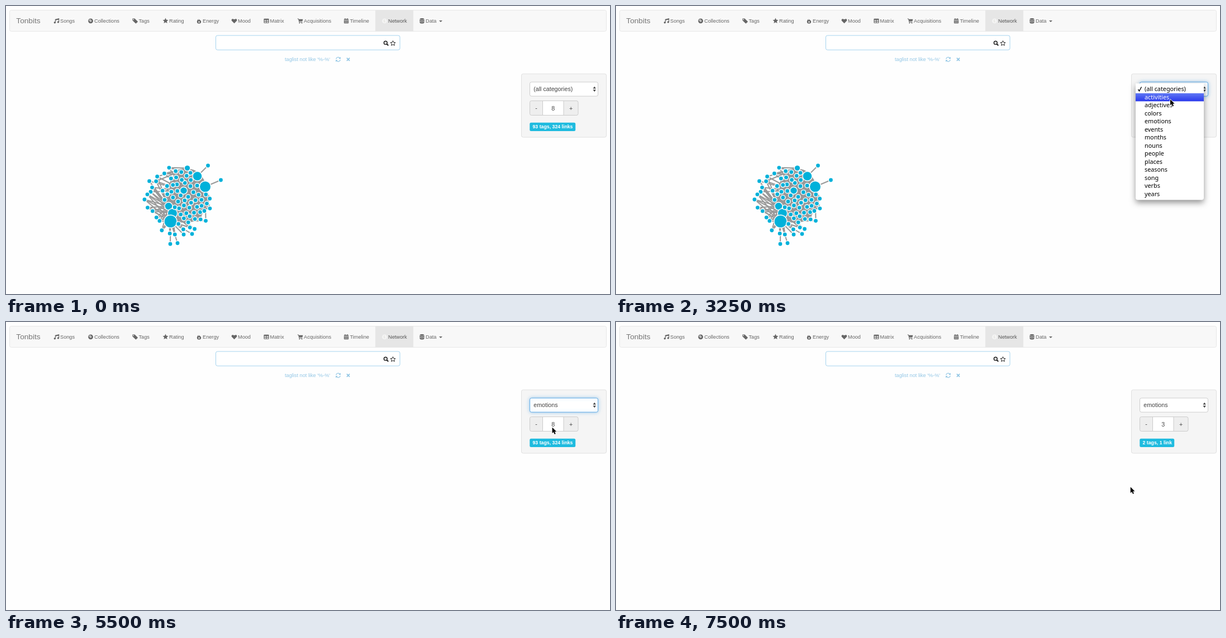
These frames come from a looping animation (1081 by 518 pixels, 8000 ms). An HTML page with a canvas:

```html
<!DOCTYPE html>
<html lang="en">
<head>
<meta charset="utf-8">
<title>Tag network</title>
<style>
html, body { margin: 0; width: 100%; height: 100%; overflow: hidden; background: #fefefe; }
canvas { display: block; }
</style>
</head>
<body>
<canvas id="stage" width="1081" height="518"></canvas>
<script>
const ctx = document.getElementById('stage').getContext('2d');
const LOOP = 8000;
const STEP = 250;
const SANS = '"Liberation Sans", Arial, sans-serif';
const MENU_FONT = '500 10.8px "Noto Sans", "Open Sans", sans-serif';
const CYAN = '#00b1da', GREY = '#999', PALE = '#92c6e5', INK = '#666', BAR = '#f8f8f8';
const ROW_TOP = 142.4, ROW = 14.5;

const NAV = [
  ['Songs', 97, 'music'], ['Collections', 158, 'disc'], ['Tags', 237.5, 'tag'],
  ['Rating', 292, 'star'], ['Energy', 352, 'flame'], ['Mood', 415, 'heart'],
  ['Matrix', 472.5, 'table'], ['Acquisitions', 533, 'cart'],
  ['Timeline', 615.5, 'calendar'], ['Network', 684, 'globe'], ['Data', 751, 'stack']
];
const CATEGORIES = ['(all categories)', 'activities', 'adjectives', 'colors',
  'emotions', 'events', 'months', 'nouns', 'people', 'places', 'seasons',
  'song', 'verbs', 'years'];

// when the pointer arrives, and where its tip is
const STOPS = [
  { t: 750, x: 993, y: 156.8 }, { t: 3250, x: 992, y: 168 }, { t: 3500, x: 989, y: 210.2 },
  { t: 5000, x: 981, y: 188 }, { t: 5250, x: 971.3, y: 191.5 },
  { t: 5500, x: 977.6, y: 189.5 }, { t: 7500, x: 920.8, y: 296.8 }
];

const pointerAt = t => STOPS.findLast(s => t >= s.t);

function text(s, x, y, size, color, style = '', align = 'left') {
  ctx.font = `${style} ${size}px ${SANS}`;
  ctx.fillStyle = color;
  ctx.textAlign = align;
  ctx.fillText(s, x, y);
}

function box(x, y, w, h, r, fill, stroke) {
  ctx.beginPath();
  ctx.roundRect(x, y, w, h, r);
  if (fill) { ctx.fillStyle = fill; ctx.fill(); }
  if (stroke) { ctx.strokeStyle = stroke; ctx.lineWidth = 1; ctx.stroke(); }
}

function dot(x, y, r, fill) {
  ctx.beginPath();
  ctx.arc(x, y, r, 0, 7);
  ctx.fillStyle = fill;
  ctx.fill();
}

function line(x1, y1, x2, y2, color = GREY, width = 2) {
  ctx.beginPath();
  ctx.moveTo(x1, y1);
  ctx.lineTo(x2, y2);
  ctx.strokeStyle = color;
  ctx.lineWidth = width;
  ctx.stroke();
}

function shape(d, fill) {
  ctx.fillStyle = fill;
  ctx.fill(new Path2D(d));
}

function outline(d, color, width) {
  ctx.strokeStyle = color;
  ctx.lineWidth = width;
  ctx.stroke(new Path2D(d));
}

function at(x, y, draw) {
  ctx.save();
  ctx.translate(x, y);
  draw();
  ctx.restore();
}

function starPath(r) {
  ctx.beginPath();
  for (let i = 0; i < 10; i++) {
    const a = i * Math.PI / 5 - Math.PI / 2, q = i % 2 ? r * .47 : r;
    ctx.lineTo(q * Math.cos(a), q * Math.sin(a));
  }
  ctx.closePath();
}

const ICONS = {
  music() {
    shape('M-2.6-3L4.6-4.8V-2.4L-2.6-.7Z', INK);
    outline('M-2.1-2V3M4.1-4V2', INK, 1.1);
    dot(-3.2, 3, 1.7, INK);
    dot(2.9, 2.1, 1.7, INK);
  },
  disc() {
    dot(0, 0, 4.4, INK);
    outline('M-2.8 0A2.8 2.8 0 0 1 0-2.8', BAR, .8);
    dot(0, 0, 1.7, BAR);
    dot(0, 0, .8, INK);
  },
  tag() {
    shape('M-4.6-4.2H-.6L4.7 1Q5 1.4 4.6 1.9L1.8 4.5Q1.3 4.8.9 4.5L-4.6-.7Z', INK);
    dot(-2.8, -2.4, .9, BAR);
  },
  star() { starPath(5.2); ctx.fillStyle = INK; ctx.fill(); },
  flame() {
    shape('M-.8-4.9C-.5-2.2 3.7-1.4 3.7 1.4A3.7 3.4 0 0 1-3.7 1.4C-3.7-.3-2.4-1.6-2.2-2.8C-1-2-.7-1.5-.6-.8C.3-2-.1-3.6-.8-4.9Z', INK);
    shape('M0 .2C1.8 1.4 1.6 3.3 0 3.3C-1.8 3.3-1.6 1.6 0 .2Z', BAR);
  },
  heart() { shape('M0 4.4L-4.2.2C-6-2-3.8-5.4 0-2.5C3.8-5.4 6-2 4.2.2Z', INK); },
  table() {
    box(-4.6, -4, 9.2, 8, 1, INK);
    ctx.fillStyle = BAR;
    for (const x of [-3.4, .6]) for (const y of [-1.6, 1.2]) ctx.fillRect(x, y, 2.8, 1.7);
  },
  cart() {
    outline('M-4.8-3.8H-3L-1.6 2.2H3.8', INK, 1);
    shape('M-2.8-3H4.9L3.9.8H-2Z', INK);
    dot(-1.2, 3.8, 1, INK);
    dot(3, 3.8, 1, INK);
  },
  calendar() {
    box(-4.1, -3.6, 8.2, 8.1, .8, INK);
    outline('M-2-4.8V-3M2-4.8V-3', INK, 1.2);
    line(-4.1, -1.6, 4.1, -1.6, BAR, .7);
    ctx.fillStyle = BAR;
    for (const x of [-2.8, -.6, 1.6]) for (const y of [-.4, 2]) ctx.fillRect(x, y, 1.2, 1.2);
  },
  globe() {
    dot(0, 0, 4.4, '#f5f5f5');
    shape('M-1-3L1-2L0 0L2 2L-1 3L-2 0Z', '#e9e9e6');
  },
  stack() {
    box(-4.2, -4.7, 8.4, 9.4, 3, INK);
    outline('M-4.2-2.2Q0-.2 4.2-2.2M-4.2.9Q0 2.9 4.2.9', BAR, .8);
  }
};

function header() {
  box(6.5, 7.5, 1068, 38, 3, BAR, '#e7e7e7');
  ctx.fillStyle = '#e6e6e6';
  ctx.fillRect(661, 8, 68, 38);
  text('Tonbits', 18.3, 31.3, 13.7, '#777');
  for (const [label, x, icon] of NAV) {
    at(x - 6.5, 26.8, ICONS[icon]);
    text(label, x, 30, 9.2, label === 'Network' ? '#555' : INK);
  }
  shape('M775 26H781L778 29Z', INK);

  box(375.5, 53, 329.5, 26, 3, '#fff', '#a5d3ef');
  ctx.beginPath();
  ctx.arc(679.3, 66.2, 2.9, 0, 7);
  ctx.strokeStyle = '#111';
  ctx.lineWidth = 1.4;
  ctx.stroke();
  line(681.4, 68.3, 684.3, 71, '#111', 1.8);
  at(692.5, 67.2, () => {
    starPath(4.7);
    ctx.strokeStyle = '#222';
    ctx.lineWidth = 1;
    ctx.stroke();
  });

  text("taglist not like '%-%'", 499, 99.2, 9.2, PALE);
  at(594.5, 96, () => {
    outline('M-3.8-.6A3.8 3.8 0 0 1 3-2.4M3.8.6A3.8 3.8 0 0 1-3 2.4', PALE, 1.2);
    shape('M4.4-4.4V-.9H.9ZM-4.4 4.4V.9H-.9Z', PALE);
  });
  outline('M609.9 93.4L615.1 98.6M615.1 93.4L609.9 98.6', PALE, 1.8);
}

function focusRing(x, y, w, h, r, power) {
  if (!power) return;
  ctx.save();
  ctx.globalAlpha = power;
  ctx.shadowColor = 'rgba(102,175,233,.6)';
  ctx.shadowBlur = 6;
  box(x, y, w, h, r, '#fff', '#66afe9');
  ctx.restore();
}

function panel(t) {
  box(922.5, 122, 152, 114, 3, '#f5f5f5', '#e0e0e0');
  const fading = t >= 5750 && t < 6000;

  box(937.5, 136.8, 122, 25.4, 3, '#fff', '#ccc');
  focusRing(937.5, 136.8, 122, 25.4, 3, t >= 3000 && t < 5750 ? 1 : fading ? .35 : 0);
  text(t < 4250 ? CATEGORIES[0] : 'emotions', 944.2, 153.3, 10.7, '#444');
  shape('M1050.5 148.6L1053.2 144.8L1055.9 148.6ZM1050.5 150.4L1053.2 154.2L1055.9 150.4Z', '#444');

  box(937.5, 170.5, 86.5, 26, 3, '#eee', '#ccc');
  box(960.5, 170.5, 37.5, 26, 0, '#fff', '#ccc');
  focusRing(960.5, 170.5, 37.5, 26, 0, t >= 6000 && t < 7500 ? 1 : fading ? .5 : 0);
  text('-', 949, 187.4, 10.7, '#444', '', 'center');
  text('+', 1011, 187.6, 10.7, '#444', '', 'center');
  text(t < 6000 ? '8' : '3', 979.2, 187.6, 10.7, '#444', '', 'center');
  if (t >= 6750 && t < 7250) line(983.3, 178, 983.3, 190, '#333', .8);

  const few = t >= 6250;
  box(937.3, 209.7, few ? 61.9 : 81.9, 15.2, 2.5, '#1fbbdf');
  text(few ? '2 tags, 1 link' : '93 tags, 324 links', 942.5, 220.2, 8.75, '#fff', 'bold');
}

function node({ x, y, r }) {
  dot(x, y, r + 1.4, '#fff');
  dot(x, y, r, CYAN);
}

function seeded(seed) {
  return () => (seed = seed * 16807 % 2147483647) / 2147483647;
}

const gap = (a, b) => Math.hypot(a.x - b.x, a.y - b.y);
const spot = (x, y, r = 3.4) => ({ x, y, r });

const hubs = [
  spot(342.5, 306, 7.8), spot(356.5, 325, 9.5), spot(318, 332, 5.8),
  spot(291, 360, 6.3), spot(298, 373, 8), spot(294.5, 387.5, 10.8), spot(324.5, 291.5, 4.6)
];
const tails = [spot(384.5, 313), spot(361.5, 287), spot(294, 428), spot(307, 426.5),
  spot(318, 411), spot(333, 410)];

// a sunflower core and a looser rim that bulges to the lower left
function scatter() {
  const rnd = seeded(41), turn = Math.PI * (3 - Math.sqrt(5)), core = [], rim = [];
  const add = (list, x, y, room) => {
    const p = spot(x, y);
    if ([...hubs, ...tails, ...core, ...rim].every(q => gap(p, q) > q.r + room)) list.push(p);
  };
  for (let i = 0; i < 64; i++) {
    const r = 6.3 * Math.sqrt(i + .5), a = i * turn;
    add(core, 322 + r * .9 * Math.cos(a) + rnd() * 3, 342 + r * Math.sin(a) + rnd() * 3, 3);
  }
  for (let i = 0; i < 48; i++) {
    const a = i * turn, bulge = 60 - 14 * Math.cos(a) + 6 * Math.sin(a);
    const r = bulge * (.82 + .2 * rnd());
    add(rim, 320 + r * Math.cos(a), 345 + r * Math.sin(a), 4);
  }
  return { core, rim };
}
const { core, rim } = scatter();

function link(a, count) {
  hubs.slice().sort((p, q) => gap(a, p) - gap(a, q)).slice(0, count)
    .forEach(h => line(a.x, a.y, h.x, h.y));
}

function network() {
  ctx.beginPath();
  ctx.ellipse(327, 341, 34, 48, 0, 0, 7);
  ctx.fillStyle = GREY;
  ctx.fill();
  core.forEach(p => link(p, 5));
  rim.forEach(p => link(p, 3));
  tails.forEach(p => link(p, 1));
  hubs.forEach(node);
  [...core, ...rim, ...tails].forEach(node);
}

function pair(t) {
  const k = .5 ** ((t - 6250) / STEP);
  const a = spot(302.3 + 2 * k, 358.3 - 2.6 * k, 2.9);
  const b = spot(320.3 - 1.5 * k, 342 + 1.6 * k, 10.6);
  line(a.x, a.y, b.x, b.y);
  node(a);
  node(b);
}

function menu(t) {
  const active = Math.floor((pointerAt(t).y - ROW_TOP) / ROW);
  ctx.save();
  ctx.shadowColor = 'rgba(0,0,0,.42)';
  ctx.shadowBlur = 11;
  ctx.shadowOffsetY = 5;
  box(930, 139.3, 122, 209.4, [0, 0, 4, 4], '#fff');
  ctx.restore();
  const top = ROW_TOP + ROW * active;
  const blue = ctx.createLinearGradient(0, top, 0, top + ROW);
  blue.addColorStop(0, '#6078f4');
  blue.addColorStop(1, '#2a39ec');
  ctx.fillStyle = blue;
  ctx.fillRect(930, top, 122, ROW);
  ctx.font = MENU_FONT;
  ctx.textAlign = 'left';
  CATEGORIES.forEach((name, i) => {
    ctx.fillStyle = i === active ? '#fff' : '#000';
    ctx.fillText(name, 946, 153.2 + ROW * i);
  });
  outline('M934.5 150L936.5 153L940.5 145.5', active ? '#000' : '#fff', 1.4);
}

function pointer(t) {
  const stop = pointerAt(t);
  if (!stop) return;
  at(stop.x, stop.y, () => {
    const d = 'M0 0V10.6L2.5 8.4L4.2 12.4L6.1 11.6L4.4 7.7H7.7Z';
    ctx.lineJoin = 'round';
    outline(d, '#fff', 1.6);
    shape(d, '#000');
  });
}

function render(t) {
  ctx.fillStyle = '#fefefe';
  ctx.fillRect(0, 0, 1081, 518);
  header();
  panel(t);
  if (t < 4250) network();
  if (t >= 6250 && t < 7500) pair(t);
  if (t >= 2750 && t < 4250) menu(t);
  pointer(t);
}

const start = performance.now();
function tick() {
  const t = (performance.now() - start) % LOOP;
  render(Math.floor(t / STEP) * STEP);
  requestAnimationFrame(tick);
}
tick();
</script>
</body>
</html>
```
